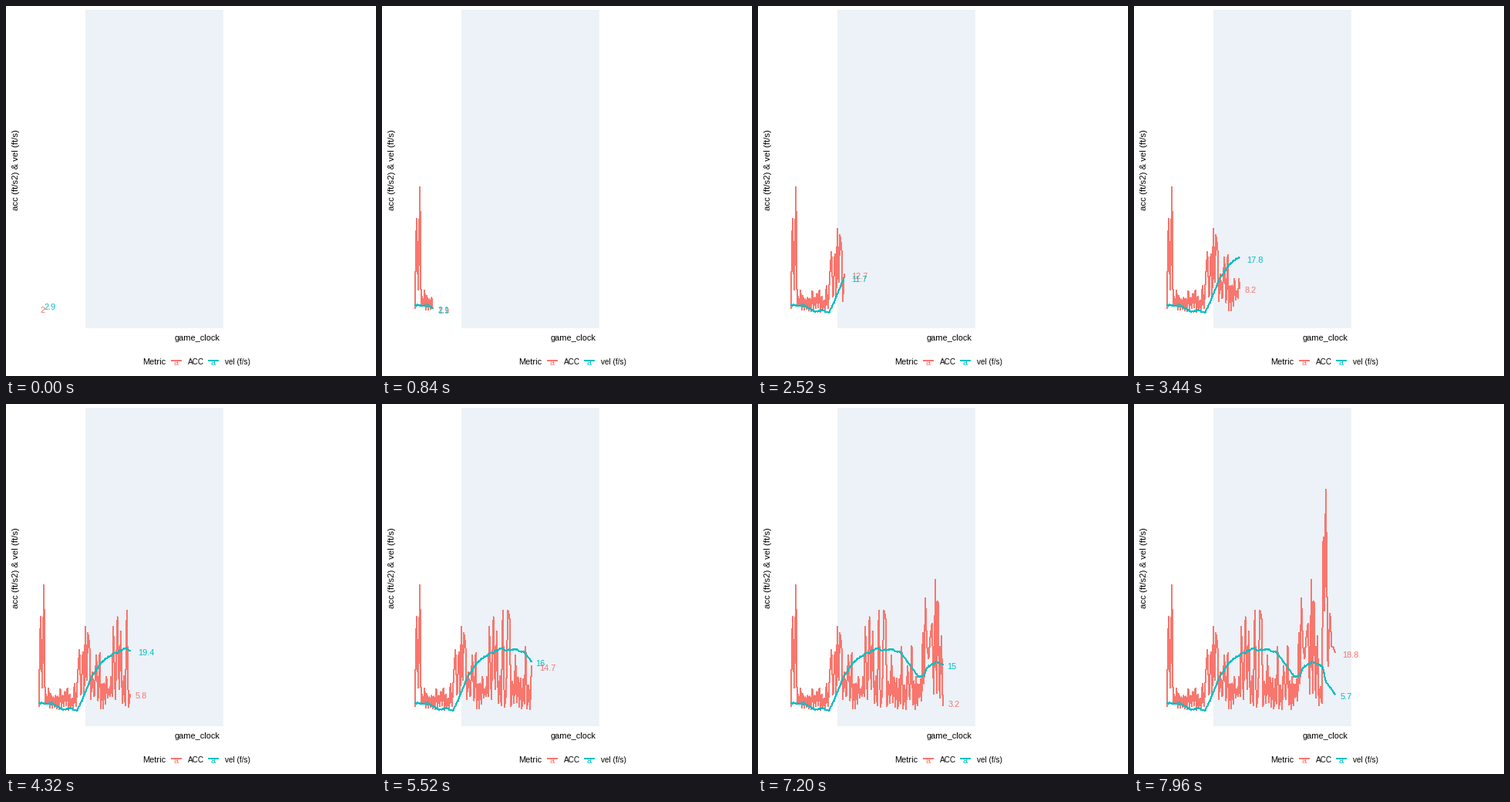
Write a matplotlib script that moves like this. It is 480 px wide and 480 px high and loops after 8 s.

```python
import numpy as np
import matplotlib.pyplot as plt
from matplotlib.animation import FuncAnimation
from matplotlib.patches import Rectangle

FRAMES, INTERVAL = 200, 40
SIZE, DPI = 480, 100
PT = 72 / DPI  # points per pixel
RED, TEAL = "#F8766D", "#00BFC4"

plt.rcParams["font.family"] = "Liberation Sans"
rng = np.random.default_rng(8)

# (time step, value): the main bursts of acceleration
BURSTS = [
    (0, 2), (2, 30), (6, 40), (42, 9), (44, 2), (46, 12), (48, 19.7),
    (52, 19), (55, 27), (58, 25), (60, 21), (63, 12.7), (68, 18), (72, 18.7),
    (88, 27), (93, 30), (97, 25.5), (104, 32), (108, 5.8), (110, 32),
    (112, 30), (119, 18), (131, 20.7), (138, 14.7), (143, 21), (156, 25),
    (159, 36), (161, 20.7), (163, 17), (165, 24), (167, 28), (171, 41.7),
    (174, 35), (178, 24), (185, 55), (188, 70), (193, 31), (195, 20.7),
    (197, 20.5), (199, 18.8),
]
# (time step, value): the bends of the velocity curve
BENDS = [
    (0, 2.9), (16, 2.9), (28, 1), (38, 1.4), (42, 0.8), (45, 0.6), (50, 3.3),
    (55, 6.4), (63, 11.7), (76, 16.3), (90, 18.7), (103, 20.3), (108, 19.4),
    (119, 19.9), (129, 19), (138, 16), (151, 11.2), (158, 11.8), (161, 14.1),
    (172, 16), (184, 14.6), (188, 9.8), (199, 5.7),
]


def fill(a, b):
    """Points between two bursts: none, one trough, or a restless zigzag."""
    (t0, v0), (t1, v1) = a, b
    gap = t1 - t0
    if gap <= 2:
        return []
    if gap <= 5:
        return [((t0 + t1) / 2, min(v0, v1) * rng.uniform(0.1, 0.6))]
    scale = 1 if t0 < 45 else 1.6
    times = np.linspace(t0, t1, 2 * round(gap / 2.8) + 1)[1:-1]
    return [(t, scale * (rng.uniform(4.5, 8) if i % 2 else rng.uniform(0.5, 3.3)))
            for i, t in enumerate(times)]


def acceleration():
    points = [BURSTS[0]]
    for a, b in zip(BURSTS, BURSTS[1:]):
        points += fill(a, b) + [b]
    return np.array(points).T


def velocity():
    bend_t, bend_v = np.array(BENDS).T
    times = np.arange(FRAMES)
    noise = rng.normal(0, 0.15, FRAMES)
    noise[bend_t.astype(int)] = 0
    return times, np.interp(times, bend_t, bend_v) + noise


def px(t):
    return 42.6 + 1.097 * np.asarray(t)


def py(v):
    return 400.5 - 4.14 * np.asarray(v)


def text_width(s, size=11):
    return size * sum(0.278 if c == "." else 0.556 for c in s)


fig = plt.figure(figsize=(SIZE / DPI, SIZE / DPI), dpi=DPI, facecolor="white")
ax = fig.add_axes([0, 0, 1, 1])
ax.set(xlim=(0, SIZE), ylim=(SIZE, 0))
ax.axis("off")


def write(x, y, s, size=11, color="black", **kw):
    return ax.text(x, y, s, fontsize=size * PT, color=color, **kw)


def stroke(xs, ys, color):
    # without antialiasing a one-pixel pen covers two pixels
    return ax.plot(xs, ys, color=color, lw=PT, antialiased=False, snap=False,
                   solid_capstyle="butt", solid_joinstyle="round")[0]


ax.add_patch(Rectangle((103, 5), 179, 413, color="#ECF2F8", lw=0, zorder=0))
write(13, 212.3, "acc (ft/s2) & vel (ft/s)", 11.4, rotation=90,
      ha="center", va="center")
write(277, 434, "game_clock", ha="right")
write(177.3, 465, "Metric")
for x, name, color in [(214, "ACC", RED), (262, "vel (f/s)", TEAL)]:
    stroke([x, x + 14], [460.3, 460.3], color)
    write(x + 7, 466, "a", color=color, ha="center")
    write(x + 21.5, 465, name, 10)


class Series:
    def __init__(self, points, color):
        self.times, self.values = points
        self.line = stroke([], [], color)
        self.label = write(0, 0, "", color=color, zorder=5)

    def show(self, t):
        tip = np.interp(t, self.times, self.values)
        past = self.times < t
        self.line.set_data(px(np.append(self.times[past], t)),
                           py(np.append(self.values[past], tip)))
        s = f"{round(float(tip), 1):g}"
        self.label.set_text(s)
        self.label.set_position((px(t) + text_width(s) / 2 - 1, py(tip) + 6))
        return self.line, self.label


series = [Series(acceleration(), RED), Series(velocity(), TEAL)]


def draw(frame):
    return [artist for s in series for artist in s.show(frame)]


anim = FuncAnimation(fig, draw, frames=FRAMES, interval=INTERVAL,
                     init_func=lambda: draw(0), repeat=True, repeat_delay=0)
plt.show()
```
